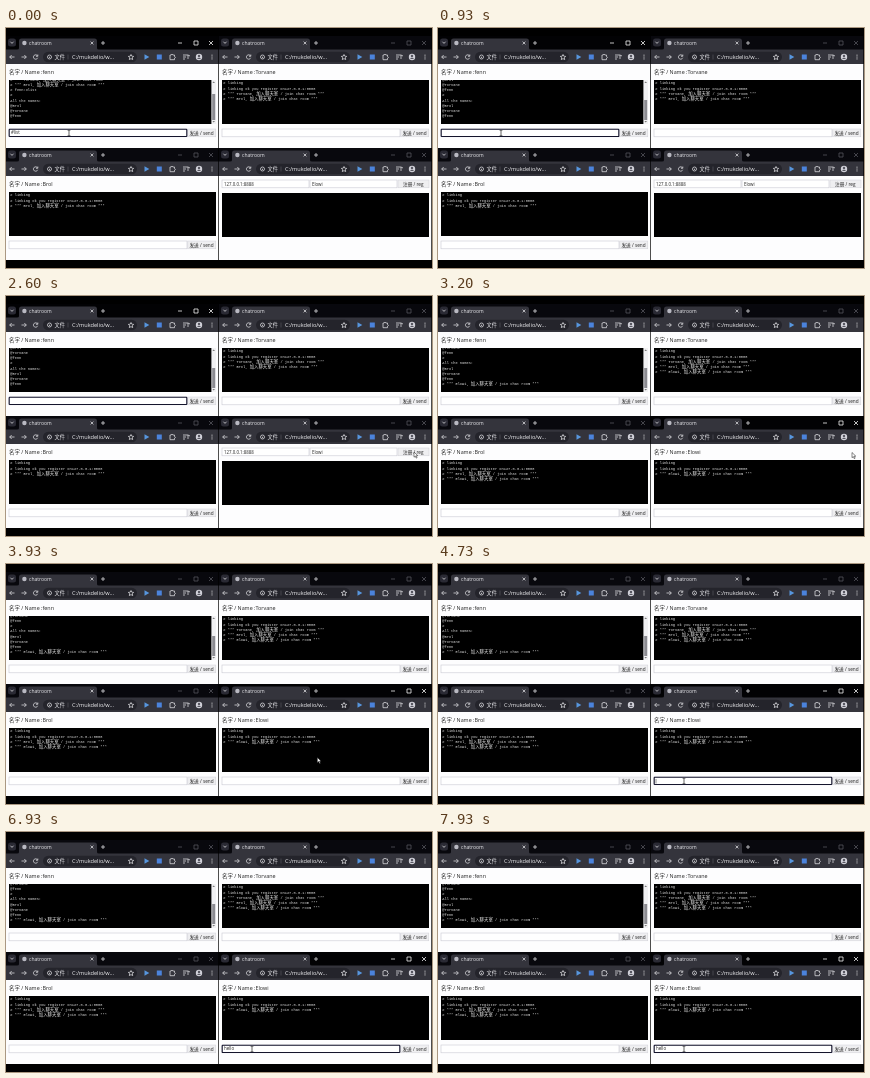
These frames come from a looping animation (426 px wide and 240 px high, 8 s). An HTML page:

```html
<!DOCTYPE html>
<html lang="zh">
<head>
<meta charset="utf-8">
<title>chatroom</title>
<style>
html, body { margin: 0; width: 100%; height: 100%; overflow: hidden; background: #000; }
svg { display: block; width: 100%; height: 100%; }
text { font-family: "Open Sans", "Noto Sans CJK SC", "Noto Sans CJK", sans-serif; white-space: pre; }
.mono { font: 3.67px "Liberation Mono", "Noto Sans CJK SC", "Noto Sans CJK", monospace; fill: #e6e6e6; }
.mono tspan { font-size: 4.4px; }
.line { fill: none; stroke: #d6d6da; stroke-width: .8; }
.field { fill: #fff; stroke: #c9c9d2; stroke-width: .6; }
.focus { fill: none; stroke: #14142c; stroke-width: 1.1; }
.button { fill: #efeff1; stroke: #cfcfd6; stroke-width: .5; }
</style>
</head>
<body>
<svg id="stage" viewBox="0 0 426 240"></svg>
<script>
const LOOP = 8000, ROW = 5.25;
const SENT = 450, CLICK = 2700, FOCUS = 4450;
const [HOST, SECOND, THIRD, GUEST] = ['fenn', 'Torvane', 'Brol', 'Elowi'];

const rect = (x, y, w, h, attrs = '') => `<rect x="${x}" y="${y}" width="${w}" height="${h}" ${attrs}/>`;
const path = (d, attrs = 'class="line"') => `<path d="${d}" ${attrs}/>`;
const text = (x, y, size, s, fill = '#222') =>
  `<text x="${x}" y="${y}" font-size="${size}" fill="${fill}">${s}</text>`;
const timed = (from, to, content) => `<g data-from="${from}" data-to="${to}">${content}</g>`;
const mono = (y, s) =>
  `<text class="mono" x="4.3" y="${y}">${s.replace(/[\u4e00-\u9fff]+/g, '<tspan>$&</tspan>')}</text>`;

const joined = name => `# *** ${name}, 加入聊天室 / join chat room ***`;
const linking = ['# linking', '# linking ok you register on127.0.0.1:8888'];
const names = ['#', 'All the names:', '@' + THIRD, '@' + SECOND, '@' + HOST];

function controls(color) {
  return path('M172 15h4M188 13h4v4h-4zM203 13l4 4m0-4l-4 4', `fill="none" stroke="${color}" stroke-width=".8"`);
}

function chrome(activeFrom, activeTo) {
  return rect(0, 8, 212.3, 14, 'fill="#08080d"') +
    controls('#55555c') + timed(activeFrom, activeTo, rect(0, 8, 212.3, 14, 'fill="#020204"') + controls('#f0f0f0')) +
    rect(2, 10.5, 8, 8, 'rx="2.5" fill="#2a2a34"') + path('M4.4 13.7l1.6 1.7l1.6-1.7') +
    path('M11 22q2 0 2-2v-7q0-2.5 2.5-2.5h73q2.5 0 2.5 2.5v7q0 2 2 2z', 'fill="#34343c"') +
    '<circle cx="18.4" cy="15" r="2.2" fill="#b9b9c2"/>' +
    text(23, 16.7, 5, 'chatroom', '#ececf0') +
    path('M84.6 13.6l2.8 2.8m0-2.8l-2.8 2.8M95 15h4m-2-2v4') +
    rect(0, 21.5, 212.3, 15, 'fill="#34343c"') +
    path('M8.5 29H3.7l2-2m-2 2l2 2M15.5 29h4.8l-2-2m2 2l-2 2M31.6 28a2.2 2.2 0 1 0 .1 1.8m.1-3.3V28.3h-1.8') +
    rect(37, 23.8, 94, 10.4, 'rx="5.2" fill="#24242b"') +
    '<circle class="line" cx="43.5" cy="29" r="2"/>' + path('M43.5 28.7v1.3') +
    text(48.5, 31, 5.2, '文件', '#e0e0e4') + path('M62 26.5v5', 'stroke="#66666e" stroke-width=".5"') +
    text(66, 31, 5.6, 'C:/mukdelio/w...', '#f0f0f2') +
    path('M125 26.5l.8 1.7 1.9.2-1.4 1.3.4 1.9-1.7-1-1.7 1 .4-1.9-1.4-1.3 1.9-.2z') +
    path('M138.5 26.2l4.8 2.8-4.8 2.8z', 'fill="#5796de"') +
    rect(150.8, 26.5, 5, 5, 'fill="#4b83dc"') +
    path('M164 27h1.2q.8-2 1.6 0h1.7v1.6q2 .8 0 1.6v1.5H164z') +
    path('M177 27h5m-5 2h3m-3 2h2m3-4v4m0-4l2 1') +
    '<circle cx="193" cy="29" r="3.2" fill="#d1d1d9"/><circle cx="193" cy="28" r="1.2" fill="#565660"/>' +
    path('M191 31q2-2.5 4 0z', 'fill="#565660"') +
    path('M206 26.7v.9m0 1v.9m0 1v.9', 'stroke="#e5e5e5" stroke-width="1"') +
    rect(0, 36, 212.3, 84, 'fill="#fdfdfe"');
}

function inputRow() {
  return rect(3, 101, 178, 7.8, 'class="field"') +
    rect(181.8, 101, 28, 7.8, 'class="button"') + text(183.4, 106.6, 4.7, '发送 / send');
}

const focusRing = rect(3.2, 101.3, 177.6, 7.2, 'rx=".6" class="focus"');
const consoleBox = (y = 52) => rect(3, y, 207, 44, 'fill="#000"');
const title = name => text(3, 45.8, 5.4, '名字 / Name :' + name);
const rows = (lines, start = 56.4) => lines.map((s, i) => mono(start + i * ROW, s)).join('');
const caret = (x, from, to) => timed(from, to, path(`M${x} 103v4.5`, 'stroke="#222" stroke-width=".5"'));

function panel(x, y, content) {
  return `<g transform="translate(${x} ${y})">${content}</g>`;
}

function scrollbar() {
  return rect(205.4, 52, 4.6, 44, 'fill="#f1f1f3"') +
    path('M206.4 55l1.3-1.5 1.3 1.5zM206.4 93l1.3 1.5 1.3-1.5z', 'fill="#777"') +
    '<rect id="thumb" x="206.2" width="3" fill="#8b8b91"/>';
}

function typing(word, times, end) {
  return times.map((t, i) => timed(t, times[i + 1] ?? end, text(5, 106.4, 4.4, word.slice(0, i + 1)))).join('');
}

const history = [joined(SECOND), joined(THIRD), `# ${HOST}:#list`, ...names];
const log = rows(history, 52.5) +
  timed(SENT, LOOP, rows(names, 52.5 + ROW * 8)) +
  timed(CLICK, LOOP, mono(52.5 + ROW * 13, joined(GUEST)));

const registerForm =
  rect(3, 40, 87, 7.8, 'class="field"') + text(5, 45.5, 4.4, '127.0.0.1:8888') +
  rect(91, 40, 87, 7.8, 'class="field"') + text(93, 45.5, 4.4, GUEST) +
  rect(179, 40, 31, 7.8, 'class="button"') + text(184, 45.7, 4.7, '注册 / reg') +
  consoleBox(53);

const stage = document.getElementById('stage');
stage.innerHTML =
  '<clipPath id="view"><rect x="3" y="52" width="202" height="44"/></clipPath>' +
  rect(0, 0, 426, 240, 'fill="#000"') +
  panel(0, 0, chrome(0, CLICK) + title(HOST) + consoleBox() +
    `<g clip-path="url(#view)"><g id="log">${log}</g></g>` + scrollbar() + inputRow() +
    timed(0, CLICK, focusRing) + timed(0, SENT, text(5, 106.4, 4.4, '#list'))) +
  panel(213, 0, chrome(-1, -1) + title(SECOND) + consoleBox() +
    rows([...linking, joined(SECOND), joined(THIRD)]) +
    timed(CLICK, LOOP, mono(56.4 + 4 * ROW, joined(GUEST))) + inputRow()) +
  panel(0, 112, chrome(-1, -1) + title(THIRD) + consoleBox() +
    rows([...linking, joined(THIRD)]) +
    timed(CLICK, LOOP, mono(56.4 + 3 * ROW, joined(GUEST))) + inputRow()) +
  panel(213, 112, chrome(CLICK, LOOP) + timed(0, CLICK, registerForm) +
    timed(CLICK, LOOP, title(GUEST) + consoleBox() + rows([...linking, joined(GUEST)]) + inputRow()) +
    timed(FOCUS, LOOP, focusRing) + caret(5, FOCUS, 5000) +
    typing('hello', [5500, 5700, 6000, 6200, 6450], LOOP)) +
  '<g id="pointer">' +
    path('M0 0v5.2l1.3-1.1.9 2 .9-.4-.9-2h1.6z', 'id="arrow" fill="#fff" stroke="#111" stroke-width=".5"') +
    path('M-1.3-2.5H-.3L0-2.2.3-2.5h1M0-2.2v4.4M-1.3 2.5h1L0 2.2l.3.3h1',
      'id="beam" fill="none" stroke="#222" stroke-width=".7"') +
  '</g>';

const $ = id => document.getElementById(id);
const pointer = $('pointer'), arrow = $('arrow'), beam = $('beam'), logGroup = $('log'), thumb = $('thumb');
const timedParts = [...stage.querySelectorAll('[data-from]')];
const show = (el, on) => el.setAttribute('visibility', on ? 'visible' : 'hidden');

// Pointer stops: time, x, y
const stops = [
  [0, 63, 105], [1300, 63, 105], [1930, 162.5, 163.5], [2500, 408, 156],
  [2800, 408, 156], [3200, 414, 156.5], [3500, 414, 156.5], [4250, 246, 217], [LOOP, 246, 217]
];

function pointerAt(t) {
  const i = stops.findIndex(s => s[0] > t);
  const [t0, x0, y0] = stops[i - 1], [t1, x1, y1] = stops[i];
  const p = (t - t0) / (t1 - t0), e = p * p * (3 - 2 * p);
  return [x0 + (x1 - x0) * e, y0 + (y1 - y0) * e];
}

function draw(now) {
  const t = now % LOOP;
  for (const el of timedParts) show(el, t >= +el.dataset.from && t < +el.dataset.to);
  const scrolled = t < SENT ? 0 : t < CLICK ? 5 : 6;
  logGroup.setAttribute('transform', `translate(0 ${-scrolled * ROW})`);
  thumb.setAttribute('y', scrolled ? 72 : 66);
  thumb.setAttribute('height', scrolled ? 20 : 26);
  const [x, y] = pointerAt(t);
  pointer.setAttribute('transform', `translate(${x} ${y})`);
  const overField = t < 1350 || t > 4200;
  show(beam, overField);
  show(arrow, !overField);
  requestAnimationFrame(draw);
}
draw(performance.now());
</script>
</body>
</html>
```
